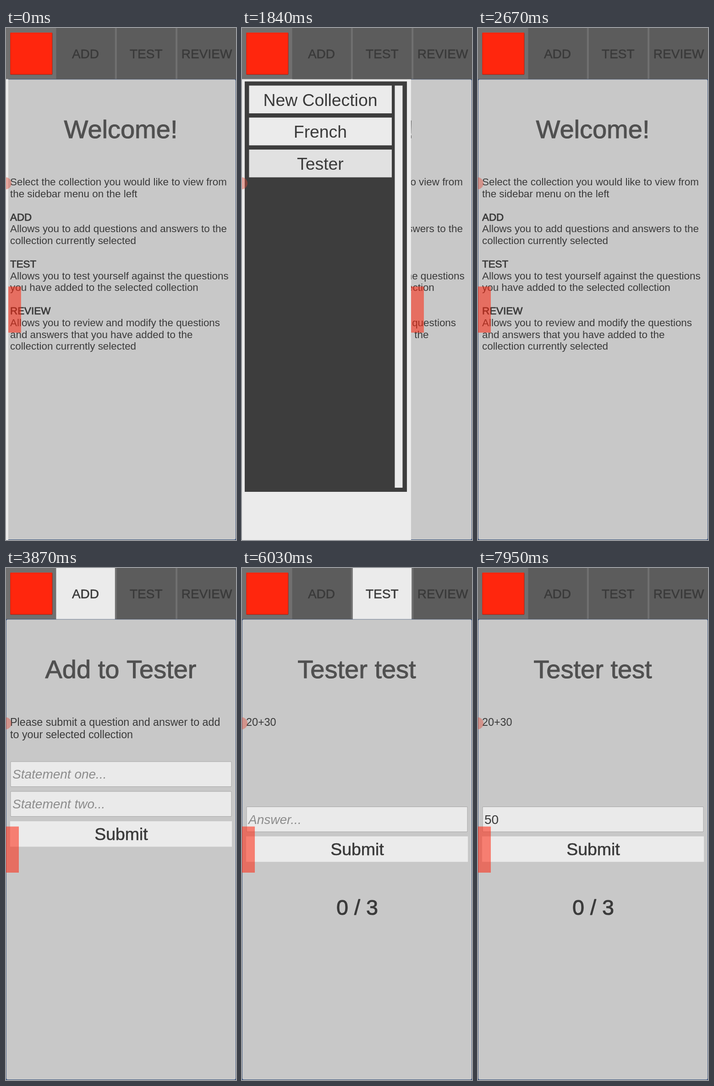
Animation, 502 px wide and 1116 px high, one loop 8 s. Source, as an HTML page with a canvas:

```html
<!DOCTYPE html>
<html>
<head>
<meta charset="utf-8">
<style>
html, body { margin: 0; width: 100%; height: 100%; overflow: hidden; background: #314d79; }
canvas { display: block; }
</style>
</head>
<body>
<canvas id="stage" width="502" height="1116"></canvas>
<script>
const ctx = document.getElementById('stage').getContext('2d');
const LOOP = 8000, STEP = 70;
const SANS = '"Liberation Sans", Arial, sans-serif', ROBOTO = 'Roboto, sans-serif';
const INK = '#3a3a3a', LIGHT = '#ebebeb', DARK = '#3d3d3d';

const clamp = v => Math.min(1, Math.max(0, v));
const smooth = u => { u = clamp(u); return u * u * (3 - 2 * u); };
const grey = v => `rgb(${v},${v},${v})`;
// Progress from 0 to 1 in n discrete steps, the first one at `start`
const ramp = (t, start, n) => clamp((Math.floor((t - start) / STEP) + 1) / n);

function rect(x1, y1, x2, y2, fill, r = 0) {
  ctx.fillStyle = fill;
  ctx.beginPath();
  ctx.roundRect(x1, y1, x2 - x1, y2 - y1, r);
  ctx.fill();
}

function text(str, x, y, size, { color = INK, align = 'left', bold = 0, style = '', font = SANS } = {}) {
  ctx.font = `${style} ${size}px ${font}`;
  ctx.textAlign = align;
  ctx.fillStyle = ctx.strokeStyle = color;
  ctx.fillText(str, x, y);
  if (bold) {
    ctx.lineWidth = bold;
    ctx.strokeText(str, x, y);
  }
}

function line(color, width, d) {
  ctx.strokeStyle = color;
  ctx.lineWidth = width;
  ctx.stroke(new Path2D(d));
}

const title = str => text(str, 250.5, 240, 56, { color: '#505050', align: 'center', bold: 1 });

function field(y, value, hint) {
  rect(9.5, y, 492.5, y + 55.5, '#a6a6a6', 2);
  rect(10.5, y + 1, 491.5, y + 54.5, '#eaeaea', 1);
  if (value) text(value, 14, y + 37.5, 28);
  else text(hint, 14, y + 37.5, 28, { color: '#8c8c8c', style: 'italic' });
}

function submit(y) {
  rect(9, y, 493, y + 55.5, LIGHT);
  text('Submit', 251.5, y + 41, 37.4, { align: 'center', bold: .6 });
}

const WELCOME = [
  'Select the collection you would like to view from', 'the sidebar menu on the left', '',
  'ADD', 'Allows you to add questions and answers to the', 'collection currently selected', '',
  'TEST', 'Allows you to test yourself against the questions', 'you have added to the selected collection', '',
  'REVIEW', 'Allows you to review and modify the questions', 'and answers that you have added to the',
  'collection currently selected'
];

function welcomePage() {
  title('Welcome!');
  WELCOME.forEach((s, i) =>
    text(s, 9, 343 + i * 25.58, 22.4, { bold: s && s === s.toUpperCase() ? .8 : 0 }));
}

function addPage(t) {
  title('Add to Tester');
  text('Please submit a question and answer to add', 9, 344, 23.3);
  text('to your selected collection', 9, 370.5, 23.3);
  field(421.5, t >= 4880 && '20+30', 'Statement one...');
  field(486.5, t >= 5280 && '50', 'Statement two...');
  submit(552);
}

function testPage(t) {
  title('Tester test');
  text('20+30', 9, 344, 23.3);
  field(520, t >= 7610 && '50', 'Answer...');
  submit(585);
  text('0 / 3', 251.5, 756, 46.7, { align: 'center', bold: 1 });
}

function sidebar(edge, testerShade) {
  ctx.save();
  ctx.translate(edge - 372, 0);
  rect(0, 111, 372, 1116, LIGHT);
  rect(9, 116.5, 363, 1011, DARK);
  rect(336.5, 125.5, 353.5, 1002, LIGHT);
  ['New Collection', 'French', 'Tester'].forEach((name, i) => {
    const y = 125.5 + i * 69.8;
    rect(18.5, y, 330, y + 60.5, i === 2 ? grey(testerShade) : LIGHT);
    text(name, 174, y + 44, 37.33, { align: 'center' });
  });
  ctx.restore();
}

function header(add, test) {
  rect(0, 0, 502, 111.5, '#707070');
  rect(9, 10, 101.5, 102, '#8a2a20', 2);
  rect(9.5, 10, 100.5, 101, '#ff260d', 1);
  [['ADD', add], ['TEST', test], ['REVIEW', 0]].forEach(([name, on], i) => {
    const x = 109.5 + i * 132.3;
    rect(x, 0, x + 128.3, 111.5, grey(Math.round(92 + 143 * on)));
    text(name, x + 64, 66, 28, { align: 'center', bold: .6 });
  });
}

function key(x, y, w, h, label, { size = 27, fill = '#e9e9e9', dy = 0 } = {}) {
  rect(x, y + 1, x + w, y + h + 1.5, '#bcbcbc', 6);
  rect(x, y, x + w, y + h, fill, 6);
  text(label, x + w / 2, y + h / 2 + size * .36 + dy, size, { align: 'center', font: ROBOTO, color: '#222' });
}

function keyboard(shown, value, underlined) {
  ctx.save();
  ctx.translate(0, (1 - shown) * 488);
  const plain = { font: ROBOTO, color: '#7b7b7b' };
  rect(0, 628, 502, 702, 'rgba(233,233,233,.45)');
  text(value, 12, 673, 21.8, plain);
  const end = 12 + ctx.measureText(value).width;
  rect(end - ctx.measureText(underlined).width, 674.5, end, 676, '#7b7b7b');
  text('OK', 441, 671, 16.5, { ...plain, align: 'center', style: '500' });

  rect(0, 702, 502, 1116, '#d5d5d5');
  rect(0, 702, 502, 751, '#e2e2e2');
  line('#222', 2, 'M34 716L24 727L34 738');
  [...",)!+';"].forEach((c, i) => text(c, 92 + i * 63, 734, 20, { align: 'center', font: ROBOTO, color: '#222' }));
  for (let i = 0; i < 3; i++) rect(462.5 + i * 7.5, 725, 466.5 + i * 7.5, 729, '#b5b5b5', 2);

  ['1234567890', '+×÷=/_€£¥₩', '!@#$%^&*()'].forEach((row, r) =>
    [...row].forEach((c, i) =>
      key(10 + i * 48.85, [760, 810, 870][r], 42, r ? 52 : 41, c, { size: r ? 27 : 28 })));
  const side = { size: 22.5, fill: '#c0c0c0' };
  key(9.5, 931.5, 59.5, 52, '1/2', side);
  [...`−'":;,?`].forEach((c, i) => key(84 + i * 48.85, 931.5, 41.5, 52, c));
  key(433, 931.5, 59, 52, '', side);
  key(9.5, 992, 66.5, 52, 'ABC', side);
  key(84, 992, 41.5, 52, ',', { size: 33, dy: 2 });
  key(133, 992, 236, 52, 'English (UK)', { size: 16.5 });
  key(377, 992, 41.5, 52, '.', { size: 33, dy: 2 });
  key(426, 992, 66, 52, '', side);
  line('#222', 2, 'M456 948H472Q475 948 475 951V964Q475 967 472 967H456L449 957.5ZM459 953L468 962M468 953L459 962');
  line('#222', 2, 'M472 1006V1016Q472 1021 467 1021H446M453 1013L446 1021L453 1029');

  line('#777', 2, 'M102 1079V1096M109.5 1079V1096M117 1079V1096M382 1083L391 1092L400 1083');
  ctx.beginPath();
  ctx.roundRect(241.5, 1079, 17.5, 17.5, 5);
  ctx.stroke();
  for (let r = 0; r < 3; r++)
    for (let i = 0; i < 6; i++)
      rect(458 + i * 4.2, 1082 + r * 4, 460.2 + i * 4.2, 1084.2 + r * 4, '#777');
  rect(463, 1094, 476, 1096, '#777');
  ctx.restore();
}

function sidebarEdge(t) {
  const since = start => Math.floor((t - start) / STEP) * STEP;
  return 372 * (t < 1840 ? smooth((since(0) + 41) / 605) : 1 - smooth((since(1840) + 32) / 600));
}

function draw(t) {
  const edge = sidebarEdge(t);
  rect(0, 0, 502, 1116, '#314d79');
  rect(.8, 112.3, 501.2, 1115, '#c8c8c8', 3);

  if (t < 3540) welcomePage();
  else if (t < 6030) addPage(t);
  else testPage(t);

  rect(edge, 563.5, edge + 28, 664, 'rgba(255,37,13,.55)');
  if (edge > .3) sidebar(edge, Math.round(235 - 10 * ramp(t, 1290, 6)));
  header(ramp(t, 3270, 2) - ramp(t, 4670, 2), ramp(t, 5820, 2) - ramp(t, 7610, 2));

  const shown = ramp(t, 4670, 4) - ramp(t, 5680, 2) + ramp(t, 7610, 2) - ramp(t, 7880, 2);
  if (shown > 0) {
    if (t < 4880) keyboard(shown, '', '');
    else if (t < 5280) keyboard(shown, '20+30', '30');
    else keyboard(shown, '50', '50');
  }

  ctx.fillStyle = 'rgba(225,75,55,.42)';
  ctx.beginPath();
  ctx.arc(-1, 338.5, 13, 0, 7);
  ctx.fill();
}

ctx.lineJoin = 'round';
function frame() {
  draw(performance.now() % LOOP);
  requestAnimationFrame(frame);
}
frame();
</script>
</body>
</html>
```
